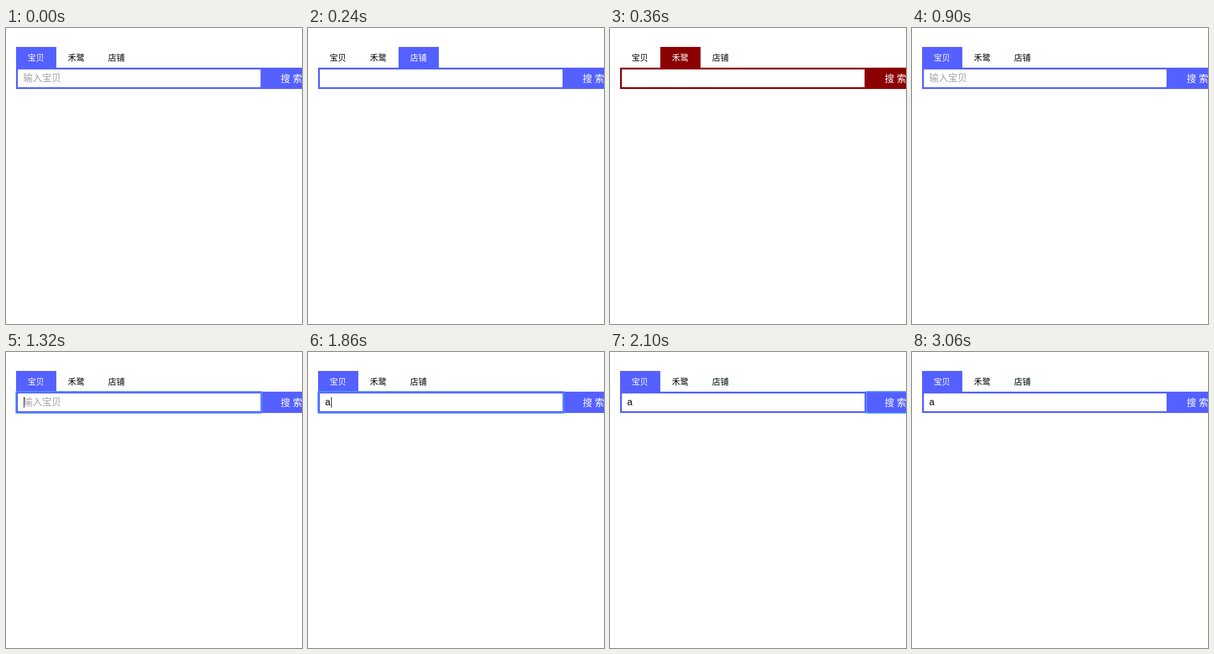
An HTML page for the animation above (3120 ms loop, 500 by 500 pixels).

```html
<!DOCTYPE html>
<html lang="zh-CN">
<head>
<meta charset="utf-8">
<title>搜索框</title>
<style>
  html, body { margin: 0; width: 100%; height: 100%; overflow: hidden; background: #fff; }
  svg { display: block; width: 500px; height: 500px; }
  text { font: 16px "Liberation Sans", "Noto Sans CJK SC", "Noto Sans CJK", sans-serif; white-space: pre; }
  .tab text { font-size: 14px; }
  .ring { fill: none; stroke: #4d90fe; stroke-width: 2; }
  .thin { font-weight: 300; }
</style>
</head>
<body>
<svg viewBox="0 0 500 500">
  <g id="tabs"></g>
  <rect id="frame" x="17" y="67" width="483" height="36"/>
  <rect x="20" y="70" width="410" height="30" fill="#fff"/>
  <text id="hint" class="thin" x="29" y="90" fill="#a0a0a0">输入宝贝</text>
  <text id="typed" x="29" y="90">a</text>
  <rect id="caret" y="76" width="1" height="18"/>
  <text class="thin" x="464" y="91" fill="#fff">搜 索</text>
  <rect id="inputRing" class="ring" x="17" y="67" width="415" height="36" rx="1"/>
  <rect id="buttonRing" class="ring" x="433" y="67" width="90" height="36" rx="1"/>
</svg>
<script>
const LOOP = 3120, BLUE = '#5460ff', RED = '#8b0000';
const $ = id => document.getElementById(id);
const show = (id, on) => $(id).setAttribute('visibility', on ? 'visible' : 'hidden');
const colors = [BLUE, RED, BLUE];

$('tabs').innerHTML = ['宝贝', '禾鹭', '店铺'].map((label, i) => {
  const x = 17 + 68 * i;
  return `<g class="tab"><rect x="${x}" y="32" width="68" height="35"/>` +
    `<text x="${x + 19.5}" y="55">${label}</text></g>`;
}).join('');
const tabs = [...document.querySelectorAll('.tab')];

function draw(t) {
  const active = t < 240 ? 0 : t < 360 ? 2 : t < 900 ? 1 : 0;
  const typed = t >= 1860;
  const focused = t >= 1320 && t < 2100;

  tabs.forEach((tab, i) => {
    const on = i === active;
    const idle = i === 2 && t >= 240 ? '#fcfeff' : '#fff';
    tab.children[0].setAttribute('fill', on ? colors[i] : idle);
    tab.children[1].setAttribute('fill', on ? '#fff' : '#000');
  });
  $('frame').setAttribute('fill', colors[active]);
  $('caret').setAttribute('x', typed ? 39 : 30);
  show('hint', active === 0 && !typed);
  show('typed', typed);
  show('caret', focused);
  show('inputRing', focused);
  show('buttonRing', t >= 2100 && t < 3060);
}

const start = performance.now();
(function tick() {
  draw((performance.now() - start) % LOOP);
  requestAnimationFrame(tick);
})();
</script>
</body>
</html>
```
